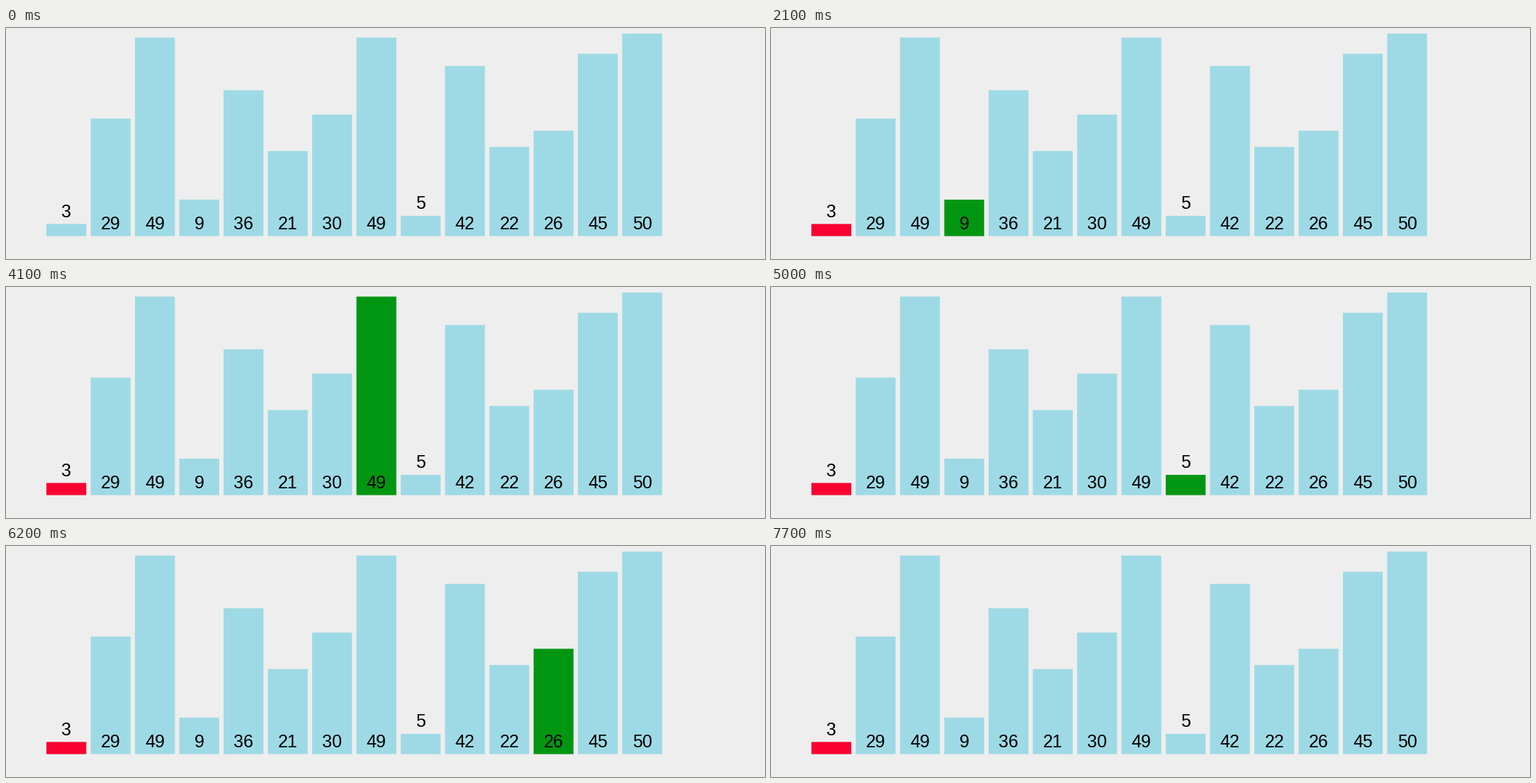
A matplotlib script for the animation above (8 s loop, 1071x327 px).

```python
import matplotlib.pyplot as plt
from matplotlib.animation import FuncAnimation
from matplotlib.patches import Rectangle

W, H, DPI = 1071, 327, 64
STEP, LOOP = 100, 8000

BACK, BAR = "#eeeeee", "#9edae5"
LOWEST, CURRENT = "#f80031", "#009612"

VALUES = [3, 29, 49, 9, 36, 21, 30, 49, 5, 42, 22, 26, 45, 50]
LEFT, BASE = 57, 294.6
PITCH, WIDTH, UNIT = 62.5, 56.25, 5.735
FONT_PX, PAD = 25, 9.6
START, DWELL = 600, 500

fig = plt.figure(figsize=(W / DPI, H / DPI), dpi=DPI, facecolor=BACK)
ax = fig.add_axes([0, 0, 1, 1])
ax.set_xlim(0, W)
ax.set_ylim(H, 0)
ax.axis("off")


def add_bar(i, value):
    x, height = LEFT + i * PITCH, value * UNIT
    bar = Rectangle((x, BASE - height), WIDTH, height, fc=BAR, lw=0, snap=False)
    ax.add_patch(bar)
    # Labels of short bars sit above them
    foot = BASE - height if height < 40 else BASE
    ax.text(x + WIDTH / 2, foot - PAD, str(value), ha="center", va="baseline",
            family="Liberation Sans", size=FONT_PX * 72 / DPI, color="black")
    return bar


bars = [add_bar(i, v) for i, v in enumerate(VALUES)]


def update(frame):
    # Bar 0 is the minimum so far; the scan visits each later bar in turn
    scan = (frame * STEP - START) // DWELL
    for i, bar in enumerate(bars):
        if i == 0:
            bar.set_facecolor(LOWEST if scan >= 0 else BAR)
        else:
            bar.set_facecolor(CURRENT if i == scan else BAR)
    return bars


anim = FuncAnimation(fig, update, frames=LOOP // STEP, interval=STEP,
                     init_func=lambda: update(0), repeat=True, repeat_delay=0)
plt.show()
```
